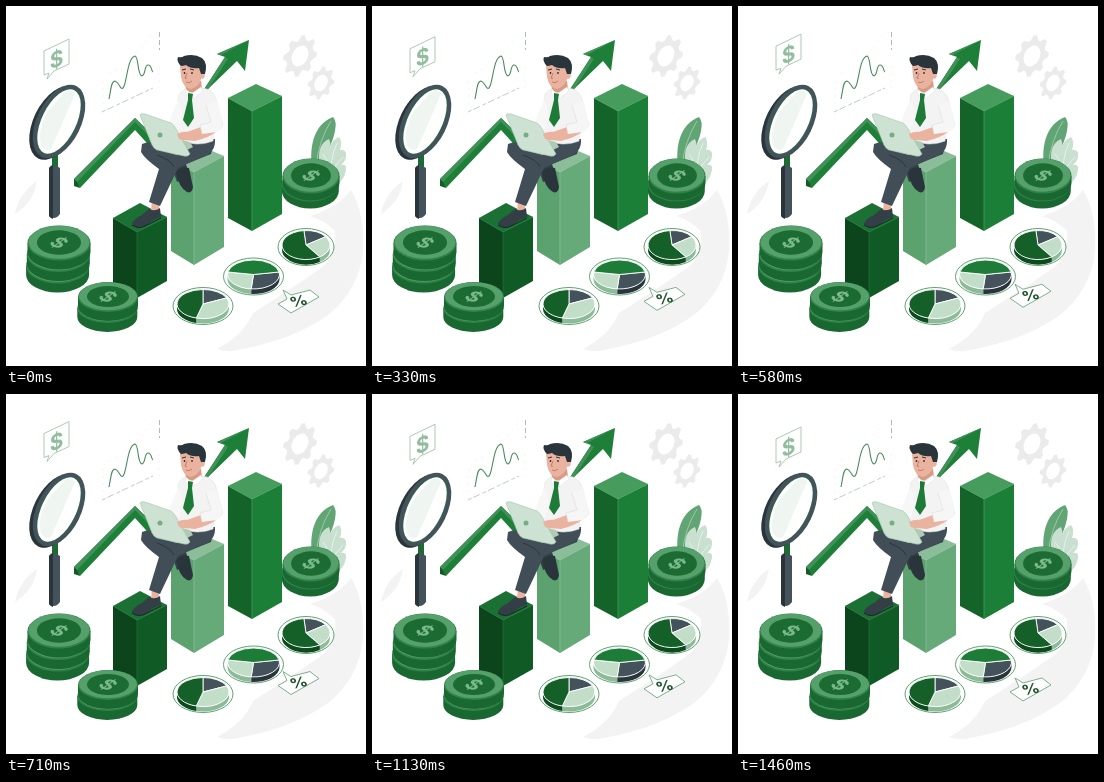
These frames come from a looping animation (360x360 px, 1.5 s). An HTML page:

```html
<!DOCTYPE html>
<html lang="en">
<head>
<meta charset="utf-8">
<title>Growth illustration</title>
<style>
html,body{margin:0;width:100%;height:100%;overflow:hidden;background:#fff}
svg{display:block;width:100vw;height:100vh}
text{font-family:Inter,Arial,sans-serif;font-weight:700;text-anchor:middle}
</style>
</head>
<body>
<svg id="stage" viewBox="0 0 360 360"></svg>
<script>
const stage = document.getElementById('stage');
const path = (d, fill, extra = '') => `<path d="${d}" fill="${fill}" ${extra}/>`;
const line = (d, color, w, extra = '') =>
  path(d, 'none', `stroke="${color}" stroke-width="${w}" stroke-linejoin="round" ${extra}`);
const oval = (x, y, rx, ry, fill, extra = '') =>
  `<ellipse cx="${x}" cy="${y}" rx="${rx}" ry="${ry}" fill="${fill}" ${extra}/>`;
const sign = (s, m, x, y, size, fill) =>
  `<text transform="matrix(${m},${x},${y})" y="${size * .36}" font-size="${size}" fill="${fill}">${s}</text>`;

const slate = '#44525c', ink = '#29343b', pale = '#c2dec9';

function backdrop() {
  return path('M345 184Q359 207 357 245Q353 284 322 309Q287 334 232 344Q222 347 211 343Q238 329 247 307Q285 283 315 262Q331 250 329 225Q318 214 304 210Q333 201 345 184Z', '#f3f3f3')
    + path('M9 208Q13 187 31 175Q28 196 9 208ZM7 216Q8 227 14 236Q9 230 7 216Z', '#f3f3f3');
}

function gear(x, y, r, teeth) {
  let d = '';
  const n = teeth * 4;
  for (let i = 0; i < n; i++) {
    const a = (i + .5) / n * Math.PI * 2, q = i % 4 < 2 ? r : r * .78;
    d += (i ? 'L' : 'M') + (q * Math.cos(a)).toFixed(1) + ' ' + (q * Math.sin(a)).toFixed(1);
  }
  return `<g transform="matrix(.87,-.28,0,1.03,${x},${y})">`
    + path(d + 'Z', '#ebebeb') + oval(0, 0, r * .5, r * .5, '#fff') + '</g>';
}

function plant() {
  return path('M306 162C303 138 309 118 327 111Q331 115 329 125C326 140 318 150 315 162Z', '#62a574')
    + line('M310 160Q313 134 325 115', '#a9d0b4', .8)
    + path('M314 160C311 145 315 136 323 133Q325 138 324 141Q327 133 333 131Q337 135 334 144Q338 143 340 147Q341 154 335 159Q341 158 340 164Q338 175 330 179Z', '#c9dfcf')
    + line('M326 173Q323 154 331 137M325 160L317 148M326 164L337 151', '#edf5ef', .8);
}

function bar(x, m, r, yl, ym, yr, yt, xt, bl, bm, br, c) {
  return path(`M${x} ${yl}L${m} ${ym}V${bm}L${x} ${bl}Z`, c[0])
    + path(`M${m} ${ym}L${r} ${yr}V${br}L${m} ${bm}Z`, c[1])
    + path(`M${x} ${yl}L${xt} ${yt}L${r} ${yr}L${m} ${ym}Z`, c[2])
    + line(`M${x} ${yl}L${m} ${ym}L${r} ${yr}M${m} ${ym}V${bm}`, c[2], .8);
}

function coin(x, y, rx, ry, h) {
  return path(`M${x - rx} ${y}v${h}a${rx} ${ry} 0 0 0 ${2 * rx} 0v${-h}Z`, '#1a6831')
    + oval(x, y, rx, ry, '#2f8348')
    + oval(x, y - .8, rx - 1, ry - 1, '#56a06b');
}

function stack(x, y, rx, ry, h, step, count) {
  let s = '';
  for (let i = count - 1; i >= 0; i--) s += coin(x - i * .7, y + i * step, rx, ry, h);
  return s + oval(x, y - .5, rx * .7, ry * .7, '#1b6b33')
    + sign('$', '.82,.38,-.72,.5', x, y - .5, 22, '#79b98a');
}

function pie(x, y, rx, ry, turn, parts) {
  const deg = Math.PI / 180;
  const px = rx - 4, py = ry - 4, cy = y - 1;
  const at = (a, dy = 0) => `${(x + px * Math.cos(a * deg)).toFixed(1)} ${(cy + dy + py * Math.sin(a * deg)).toFixed(1)}`;
  let s = oval(x, y + 1, rx, ry, '#fff', 'stroke="#4b9a60" stroke-width=".9"');
  let a = turn, top = '';
  for (const [size, color, side] of parts) {
    const b = a + size, from = Math.max(a, 0), to = Math.min(b, 180);
    if (to > from)
      s += path(`M${at(from)}A${px} ${py} 0 0 1 ${at(to)}L${at(to, 5)}A${px} ${py} 0 0 0 ${at(from, 5)}Z`, side);
    top += path(`M${x} ${cy}L${at(a)}A${px} ${py} 0 ${size > 180 ? 1 : 0} 1 ${at(b)}Z`, color,
      'stroke="#fff" stroke-width=".9"');
    a = b;
  }
  return s + top;
}

function lens() {
  const ring = (x, y, rx, ry, fill) => oval(x, y, rx, ry, fill, `transform="rotate(26 ${x} ${y})"`);
  return path('M46 147h6v15h-6Z', '#1c6b33')
    + path('M43 162Q48 157 54 162V208Q49 215 43 210Z', slate)
    + path('M43 162Q45 159 47 159V213Q44 212 43 210Z', ink)
    + ring(49.5, 117, 22, 39.5, ink)
    + ring(53, 115.5, 22, 39.5, slate)
    + ring(53, 115.5, 18, 35.5, '#2c6b43')
    + ring(53, 115.5, 17.2, 34.8, '#fff')
    + path('M35 139Q31 125 42 105L59 86Q66 82 69 88L45 143Q39 146 35 139Z', '#eff5f0');
}

function chart() {
  return line('M96 106L147 82', '#b4c9b9', .9, 'stroke-dasharray="4 2 7 3"')
    + line('M153.500 26V44', '#9fb8a6', .9, 'stroke-dasharray="5 3"')
    + line('M97 105V70M103 67L112 63M122 58L146 28L153 26M153 60V82', '#e6eee8', .6, 'stroke-dasharray="2 5"')
    + line('M103 93C105 84 105 75 109 75C113 76 114 84 117 82C121 78 121 52 129 50C133 51 131 69 136 70C140 69 138 59 142 59C146 59 145 65 147 66', '#4c8b5f', 1.1);
}

function arrow() {
  return path('M68 173L129 112L160 142L219 51L211 48L243 34L239 65L231 55L202 83L160 158L129 124L74 182Z', '#1e7f39')
    + path('M68 173L129 112L160 142L219 51L211 48L243 34L215 49L222 53L160 147L129 116L71 176Z', '#3f9157')
    + path('M68 173L71 176L74 182L68 180Z', '#125a26');
}

function man() {
  const pants = '#414e57', skin = '#eab39f';
  return path('M178 143Q165 147 163 153L171 176L184 171L180 158L205 148L208 133Z', '#343f47')
    + path('M170 166Q175 160 183 162L187 181Q186 188 181 186Q173 182 170 166Z', ink)
    + path('M146 192L153 194L153 206L145 206Z', skin)
    + path('M136 138Q147 133 160 140L187 133L209 133Q210 147 196 151L172 162L154 200L143 196L153 163Q139 153 135 146Z', pants)
    + line('M168 161Q165 154 151 149', ink, .9)
    + path('M143 203Q149 206 154 202L155 211Q147 213 141 219Q131 224 126 218Q127 213 136 209Z', '#333e46')
    + line('M126 219Q133 224 141 219L155 212', '#1a2227', 1)
    + path('M173 88Q176 84 182 82H196Q208 83 211 96L217 119Q215 125 208 125L207 135Q190 142 173 133L169 119Z', '#f3f3f3', 'stroke="#e2e5e3" stroke-width=".6"')
    + path('M179 76L195 75L196 83Q188 90 180 84Z', '#d99a85')
    + path('M174 60Q175 53 185 53Q196 54 196 66Q196 80 185 83Q177 82 175 71Z', skin)
    + oval(196, 69, 2.8, 3.8, skin)
    + path('M175 60Q170 55 172 51Q176 52 178 50Q188 47 196 52Q202 57 199 68L195 68L193 62Q185 63 180 59Q177 60 175 60Z', ink)
    + line('M176 64l4 -1M184 63l4 1', ink, 1)
    + oval(178.5, 67, .8, 1.1, '#222') + oval(186, 67, .8, 1.1, '#222')
    + line('M181 67l-2 5 2 .5M180 76q3 2 6 -1', '#b9705c', .8)
    + path('M180 83L185 88L195 81L197 85L187 93L179 88Z', '#fff', 'stroke="#dcdfdd" stroke-width=".5"')
    + path('M182 87L187 88L186 94L188 112L182 121L177 114L182 94Z', '#1d7a37')
    + path('M173 94Q166 105 163 118L173 124L177 109Z', '#f7f7f7')
    + path('M195 121L211 118L210 126Q202 132 189 135L178 134Q171 133 172 129L181 126Z', skin)
    + path('M200 99L205 116L194 119L196 128L211 126Q218 122 216 114L211 95Z', '#f6f6f6')
    + line('M200 99L205 116L194 119L196 128', '#d8ddda', .6)
    + path('M149 143L171 149L187 141L184 136L163 131Z', '#aecbb6')
    + path('M134 109Q135 107 139 108L165 117Q168 119 170 123L184 148Q182 151 178 150L151 144Q148 143 146 139Z', '#cde2d3', 'stroke="#9fc6aa" stroke-width=".6"')
    + oval(154, 129, 2.5, 2.5, '#75ad85')
    + path('M171 128Q178 124 187 127L188 132Q180 136 173 133Z', skin);
}

const bars = bar(165, 188, 218, 156, 166, 150, 139, 192, 245, 259, 241, ['#5ba26f', '#67aa7a', '#8abd98'])
  + bar(222, 246, 276, 92, 105, 90, 78, 250, 212, 225, 208, ['#146329', '#1b7f37', '#459c5c'])
  + bar(107, 131, 161, 212, 226, 211, 197, 134, 277, 292, 275, ['#0c451c', '#105b25', '#1b7134']);

const deep = ['#156029', '#0d4a1e'], leaf = ['#1d7c37', '#156029'],
  mint = [pale, '#8dbb99'], grey = [slate, ink];

stage.innerHTML = backdrop()
  + gear(294, 50, 19.5, 8) + gear(315, 77, 15.5, 8)
  + chart() + plant()
  + stack(305, 170, 28.5, 17.5, 7, 8, 2)
  + arrow() + bars + man() + lens()
  + stack(53, 237, 31.5, 17.5, 9, 11.5, 3)
  + stack(102, 291, 30, 15, 9, 11, 2)
  + pie(300, 240, 28, 18.5, -95, [[60, ...grey], [90, ...mint], [210, ...deep]])
  + pie(247.5, 269.5, 30, 18.5, -10, [[105, ...grey], [95, ...mint], [160, ...leaf]])
  + pie(197, 299, 30, 18.5, -90, [[65, ...grey], [130, ...mint], [165, ...deep]])
  + '<g id="dollar">'
  + path('M38 45L63 33V58L48 65L41 73L43 67L38 69Z', '#fff', 'stroke="#a3c3ac" stroke-width=".9"')
  + sign('$', '.95,-.36,0,1', 50.5, 53, 22, '#93bd9f') + '</g>'
  + '<g id="percent">'
  + path('M277 284L285 289L304 284L313 291L285 307L272 298L281 293Z', '#fff', 'stroke="#6ea87e" stroke-width=".9" stroke-linejoin="round"')
  + sign('%', '1,-.22,.3,.8', 292.5, 295, 17, '#22542f') + '</g>';

const dollar = document.getElementById('dollar');
const percent = document.getElementById('percent');

function draw(ms) {
  const lift = (1 - Math.cos(ms / 1500 * Math.PI * 2)) / 2;
  dollar.setAttribute('transform', `translate(0 ${(-5.5 * lift).toFixed(2)})`);
  percent.setAttribute('transform', `translate(0 ${(-6.5 * lift).toFixed(2)})`);
}

const start = performance.now();
function tick() {
  draw((performance.now() - start) % 1500);
  requestAnimationFrame(tick);
}
draw(0);
tick();
</script>
</body>
</html>
```
